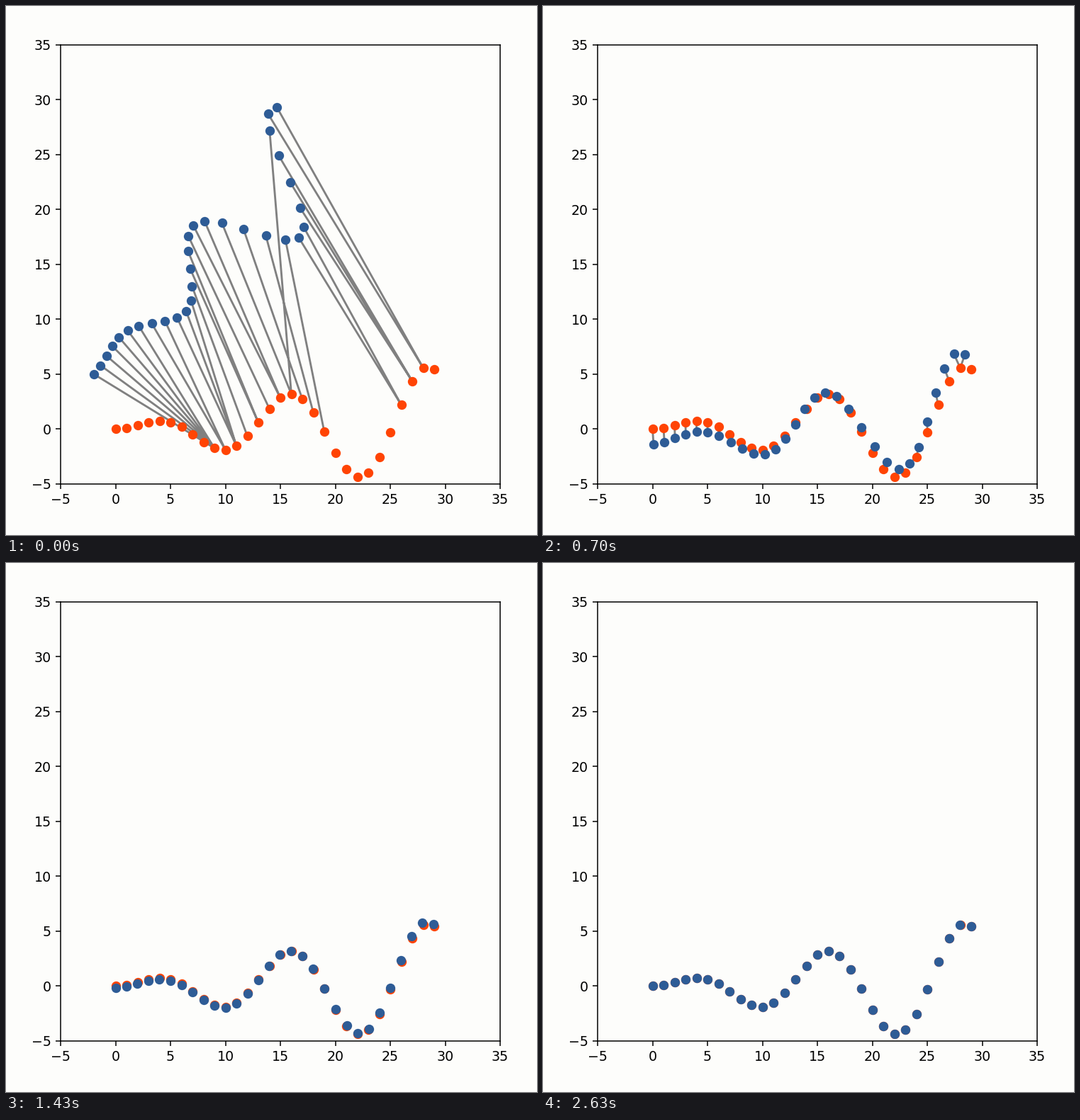
A matplotlib script that plays this animation: 749 by 747 pixels, repeating every 3.16 s.

```python
import numpy as np
import matplotlib.pyplot as plt
from matplotlib.animation import FuncAnimation

WIDTH, HEIGHT, DPI = 749, 747, 128
LOOP_MS, STEP_MS = 3160, 20
FIRST_HOLD_MS, HOLD_MS = 200, 500
PAPER = "#fdfdfb"

# Default plot styling, enlarged a little
SCALE = 1.07
plt.rcParams.update({
    "font.family": "DejaVu Sans",
    "font.size": 10 * SCALE,
    "lines.linewidth": 1.5 * SCALE,
    "lines.markersize": 6 * SCALE,
    "axes.linewidth": 0.8 * SCALE,
})
for axis in ("xtick", "ytick"):
    plt.rcParams[f"{axis}.major.size"] = 3.5 * SCALE
    plt.rcParams[f"{axis}.major.pad"] = 3.5 * SCALE
    plt.rcParams[f"{axis}.major.width"] = 0.8 * SCALE


def make_clouds(count=30, angle=np.pi / 4, shift=(-2, 5)):
    """Return the moved cloud and the fixed cloud, each of shape (2, count)."""
    x = np.arange(count, dtype=float)
    fixed = np.array([x, 0.2 * x * np.sin(0.5 * x)])
    c, s = np.cos(angle), np.sin(angle)
    moved = np.array([[c, -s], [s, c]]) @ fixed + np.reshape(shift, (2, 1))
    return moved, fixed


def nearest(a, b):
    """Index of the closest point of b for each point of a."""
    dist = np.linalg.norm(a[:, :, None] - b[:, None, :], axis=0)
    return dist.argmin(axis=1)


def icp(moved, fixed, iterations=10):
    """Align moved to fixed; return (points, matches) for every iteration."""
    fixed_mid = fixed.mean(axis=1, keepdims=True)
    fixed_c = fixed - fixed_mid
    states = []
    points = moved
    for _ in range(iterations):
        mid = points.mean(axis=1, keepdims=True)
        centered = points - mid
        match = nearest(centered, fixed_c)
        states.append((points, match))
        u, _, vt = np.linalg.svd(fixed_c[:, match] @ centered.T)
        points = u @ vt @ centered + fixed_mid
    return states


moved, fixed = make_clouds()
states = icp(moved, fixed)

fig = plt.figure(figsize=(WIDTH / DPI, HEIGHT / DPI), dpi=DPI, facecolor=PAPER)
left, right, top, bottom = 77, 697, 55, 674.5
ax = fig.add_axes([left / WIDTH, 1 - bottom / HEIGHT,
                   (right - left) / WIDTH, (bottom - top) / HEIGHT],
                  facecolor=PAPER)
ax.set(xlim=(-5, 35), ylim=(-5, 35),
       xticks=range(-5, 36, 5), yticks=range(-5, 36, 5))

links, = ax.plot([], [], color="grey")
ax.plot(*fixed, "o", color="#ff4404", markeredgewidth=SCALE)
dots, = ax.plot([], [], "o", color="#2e5c96", markeredgewidth=SCALE)


def update(frame):
    t = frame * STEP_MS
    step = max(0, (t - FIRST_HOLD_MS) // HOLD_MS + 1)
    points, match = states[step]
    dots.set_data(*points)
    # NaN between pairs breaks the line into separate segments
    gap = np.full_like(points, np.nan)
    pairs = np.stack([points, fixed[:, match], gap], axis=2)
    links.set_data(*pairs.reshape(2, -1))
    return links, dots


anim = FuncAnimation(fig, update, frames=LOOP_MS // STEP_MS,
                     interval=STEP_MS, repeat=True, repeat_delay=0)
plt.show()
```
